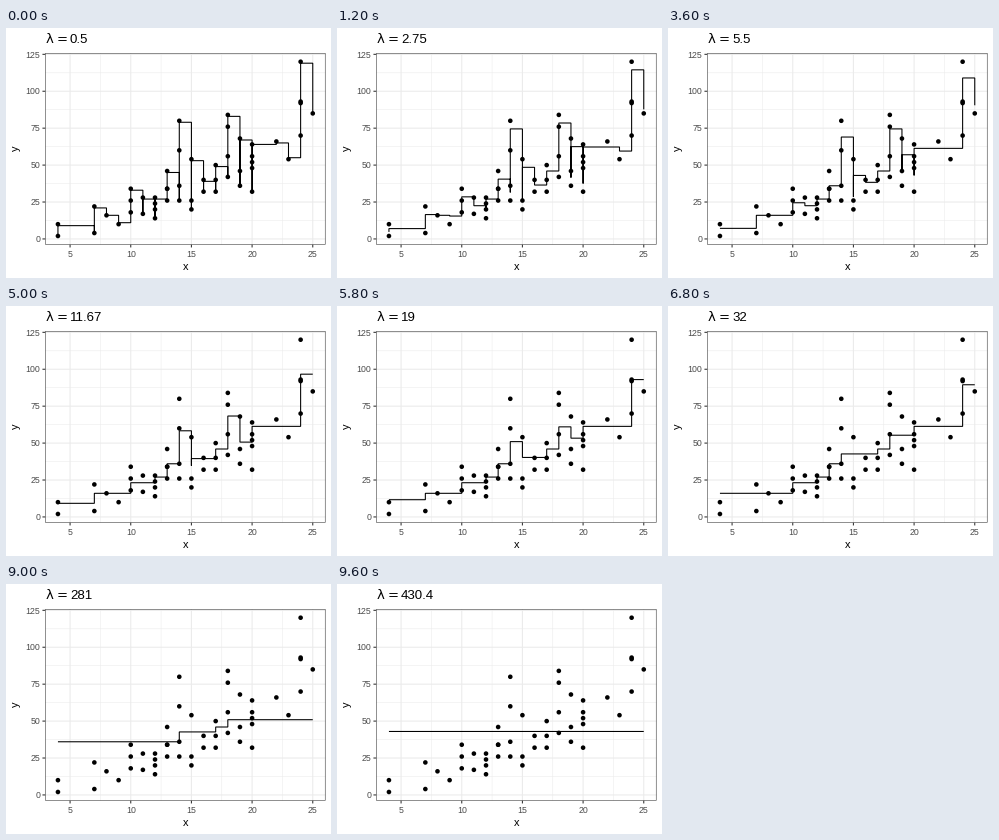
Animation, 325 px wide and 250 px high, one loop 9.8 s. Source, as a matplotlib script:

```python
from itertools import groupby

import matplotlib.pyplot as plt
import numpy as np
from matplotlib.animation import FuncAnimation
from matplotlib.patches import Circle, Rectangle

W, H, DPI = 325, 250, 100
PT = 72 / DPI  # points per pixel
LEFT, RIGHT, TOP, BOTTOM = 39.2, 319.5, 25.0, 216.7
GRID, DARK, GREY = "#ebebeb", "#333333", "#4d4d4d"
plt.rcParams["font.family"] = "Liberation Sans"

# The classic "cars" data: stopping distances, grouped by rising speed
speeds = [4, *range(7, 21), *range(22, 26)]
stops = [[2, 10], [4, 22], [16], [10], [18, 26, 34], [17, 28],
         [14, 20, 24, 28], [26, 34, 34, 46], [26, 36, 60, 80], [20, 26, 54],
         [32, 40], [32, 40, 50], [42, 56, 76, 84], [36, 46, 68],
         [32, 48, 52, 56, 64], [66], [54], [70, 92, 93, 120], [85]]
speed = np.repeat(speeds, [len(s) for s in stops])
dist = sum(stops, [])
TIE_KNOT = 40  # extra knot caused by the equal neighbours 34, 34


def fused_path(y):
    """Knots and fits of the 1D fused lasso, from the first fusion to the last."""
    runs = [(v, len(list(g))) for v, g in groupby(y)]
    size = [n for _, n in runs]
    total = [v * n for v, n in runs]
    sign = [0, *(1 if b > a else -1 for (a, _), (b, _) in zip(runs, runs[1:])), 0]

    def slope(i):
        return (sign[i + 1] - sign[i]) / size[i]

    def fit(lam):
        means = [t / n + lam * slope(i) for i, (t, n) in enumerate(zip(total, size))]
        return lam, np.repeat(means, size)

    def hit(i, now):
        s = sign[i + 1]
        gap = s * (total[i + 1] / size[i + 1] - total[i] / size[i])
        rate = s * (slope(i + 1) - slope(i))
        if gap + now * rate < 1e-9:  # already touching
            return now
        return -gap / rate if rate < -1e-12 else np.inf

    path, last = [], 0
    while len(size) > 1:
        hits = [hit(i, last) for i in range(len(size) - 1)]
        i = int(np.argmin(hits))
        lam = hits[i]
        if last < TIE_KNOT < lam:
            path.append(fit(TIE_KNOT))
        path.append(fit(lam))
        size[i:i + 2] = [size[i] + size[i + 1]]
        total[i:i + 2] = [total[i] + total[i + 1]]
        del sign[i + 1]
        last = lam
    return path


def px(v):
    return LEFT + (np.asarray(v) - 2.95) / 23.1 * (RIGHT - LEFT)


def py(v):
    return BOTTOM - (np.asarray(v) + 3.9) / 129.8 * (BOTTOM - TOP)


fig = plt.figure(figsize=(W / DPI, H / DPI), dpi=DPI, facecolor="white")
ax = fig.add_axes([0, 0, 1, 1])
ax.set(xlim=(0, W), ylim=(H, 0))
ax.axis("off")


def rule(x, y, color, width, z):
    return ax.plot(x, y, color=color, lw=width * PT, zorder=z, snap=False,
                   solid_capstyle="butt", solid_joinstyle="miter")[0]


def label(x, y, s, size, color="black", **kw):
    return ax.text(x, y, s, fontsize=size * PT, color=color, va="baseline", **kw)


# Grid, ticks and tick labels
for v in np.arange(7.5, 25, 5):
    rule([px(v)] * 2, [TOP, BOTTOM], GRID, 0.53, 1)
for v in np.arange(12.5, 125, 25):
    rule([LEFT, RIGHT], [py(v)] * 2, GRID, 0.53, 1)
for v in range(5, 26, 5):
    x = px(v)
    rule([x, x], [TOP, BOTTOM], GRID, 1.07, 2)
    rule([x, x], [BOTTOM, BOTTOM + 2.75], DARK, 1.07, 2)
    label(x, BOTTOM + 12, str(v), 8.8, GREY, ha="center")
for v in range(0, 126, 25):
    y = py(v)
    rule([LEFT, RIGHT], [y, y], GRID, 1.07, 2)
    rule([LEFT - 2.75, LEFT], [y, y], DARK, 1.07, 2)
    label(LEFT - 4.95, y + 3.2, str(v), 8.8, GREY, ha="right")

for x, y in zip(px(speed), py(dist)):
    ax.add_patch(Circle((x, y), 2.3, color="black", lw=0, zorder=4))

# Only the inner half of the border stroke is visible
ax.add_patch(Rectangle((LEFT + 0.27, TOP + 0.27), RIGHT - LEFT - 0.54,
                       BOTTOM - TOP - 0.54, fill=False, ec=DARK,
                       lw=0.54 * PT, snap=False, zorder=5))

label((LEFT + RIGHT) / 2, 241.5, "x", 11, ha="center")
label(12.5, (TOP + BOTTOM) / 2 - 0.5, "y", 11, ha="center",
      rotation=90, rotation_mode="anchor")
label(LEFT, 15, "λ", 13.2, family="DejaVu Sans")
label(50.6, 15, "=", 13.2, family="DejaVu Sans")
value = label(64, 15, "", 13.2)

path = fused_path(dist)
step = rule([], [], "black", 1.07, 3)
step.set_drawstyle("steps-post")


def draw(k):
    lam, beta = path[k]
    step.set_data(px(speed), py(beta))
    value.set_text(f"{lam:.4g}")
    return step, value


anim = FuncAnimation(fig, draw, frames=len(path), interval=200,
                     repeat=True, repeat_delay=0)
plt.show()
```
